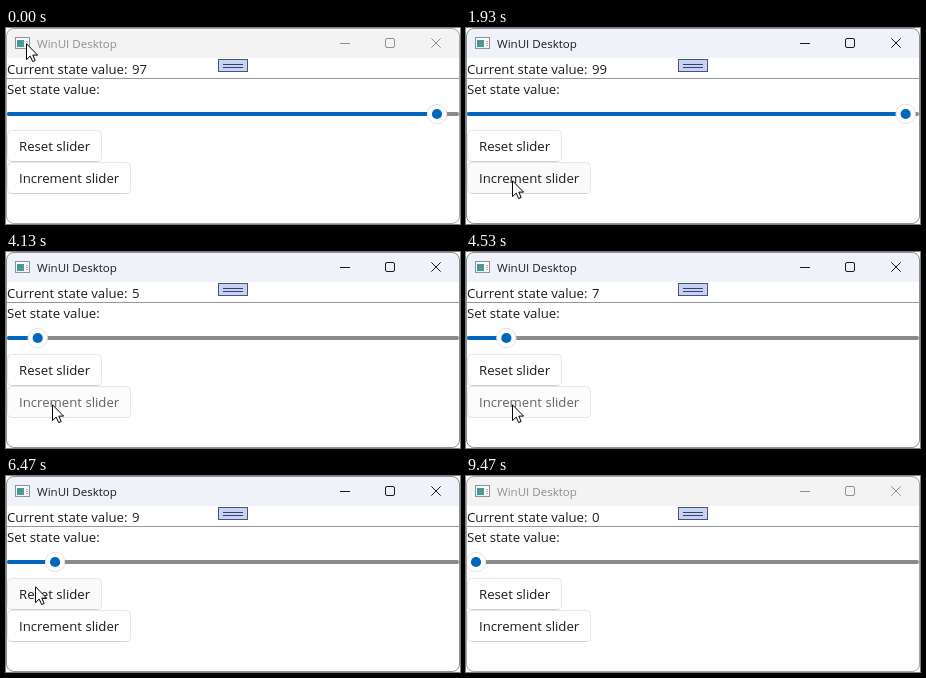
Recreate the animation shown at these times as an HTML page. Size 454 px wide and 196 px high, loop 9590 ms.

```html
<!DOCTYPE html>
<html lang="en">
<head>
<meta charset="utf-8">
<title>WinUI Desktop</title>
<style>
html, body { margin: 0; width: 100%; height: 100%; overflow: hidden; background: #fff; }
svg { display: block; font: 13.2px "Open Sans", "Noto Sans", sans-serif; fill: #1b1b1b; }
#bar { fill: #eff3f9; }
#caption { fill: #1a1a1a; font-size: 11.55px; }
#controls { fill: none; stroke: #1a1a1a; }
#frame { fill: none; stroke: #8c9096; }
.idle #bar { fill: #f3f3f3; }
.idle #caption { fill: #8f8f8f; }
.idle #controls { stroke: #8f8f8f; }
.idle #frame { stroke: #a6a6a6; }
.button rect { fill: #fefefe; stroke: #e6e6e6; }
.button path { stroke: #d0d0d0; }
.hover rect { fill: #fafafa; }
.pressed rect { fill: #fcfcfc; }
.pressed path { stroke: #e6e6e6; }
.pressed text { fill: #636363; }
.accent { fill: #0067c0; }
.over .accent { fill: #1975c5; }
</style>
</head>
<body>
<svg id="stage" width="454" height="196" viewBox="0 0 454 196">
  <defs>
    <clipPath id="round"><rect width="454" height="196" rx="8"/></clipPath>
    <linearGradient id="pane" x2="1" y2="1">
      <stop stop-color="#3f8fb0"/><stop offset="1" stop-color="#4fa586"/>
    </linearGradient>
  </defs>
  <g clip-path="url(#round)">
    <rect width="454" height="196" fill="#fff"/>
    <rect id="bar" width="454" height="30"/>
    <rect x="9.5" y="9.5" width="14" height="11" fill="#f8f8f8" stroke="#8d9499"/>
    <rect x="11" y="12" width="7" height="7" fill="url(#pane)"/>
    <path d="M20 13.5h2M20 15.5h2M20 17.5h2" stroke="#a9b0b4"/>
    <text id="caption" x="31" y="20">WinUI Desktop</text>
    <g id="controls">
      <path d="M334 15.5h10M425.3 10.3l9.4 9.4M434.7 10.3l-9.4 9.4"/>
      <rect x="379.5" y="10.5" width="9" height="9" rx="1.5"/>
    </g>

    <text x="1" y="46">Current state value:</text>
    <text id="value" x="126" y="46"></text>
    <path d="M0 50.5H454" stroke="#989898"/>
    <rect x="212.5" y="31.5" width="29" height="12" fill="#c8d3f4" stroke="#47527f"/>
    <path d="M217 36.5h20M217 39.5h20" stroke="#35406e"/>
    <text x="1" y="66">Set state value:</text>

    <g id="slider">
      <rect x="1" y="84" width="452" height="4" rx="2" fill="#8a8a8a"/>
      <rect id="fill" class="accent" x="1" y="84" height="4" rx="2"/>
      <g id="thumb">
        <circle r="9.7" fill="#fff" stroke="#e2e2e2"/>
        <circle class="accent" r="5.1"/>
      </g>
    </g>

    <g id="reset" class="button">
      <rect x="1.5" y="102.5" width="94" height="31" rx="4"/>
      <path d="M5 133.5h87"/>
      <text x="13" y="123">Reset slider</text>
    </g>
    <g id="increment" class="button">
      <rect x="1.5" y="134.5" width="123" height="31" rx="4"/>
      <path d="M5 165.5h116"/>
      <text x="13" y="155">Increment slider</text>
    </g>
  </g>
  <rect id="frame" x=".5" y=".5" width="453" height="195" rx="7.5"/>
  <path id="cursor" d="M.5 .8V16.6L4.2 13.1 6.7 18.6 9.2 17.5 6.8 12.1H11.6Z"
        fill="#fff" stroke="#000" stroke-linejoin="round"/>
</svg>
<script>
const LOOP = 9590, RATE = 15;
const $ = id => document.getElementById(id);

// All times below are ticks of 1/15 s.
const values = [[0, 97], [19, 98], [29, 99], [39, 100], [49, 1], [53, 2], [56, 3],
  [58, 4], [61, 5], [64, 6], [67, 7], [69, 8], [73, 9], [111, 0]];
const presses = {
  increment: [[17, 19], [27, 29], [38, 39], [47, 49], [51, 53], [60, 61],
    [62, 64], [65, 67], [68, 69], [70, 73]],
  reset: [[109, 111]]
};

const smooth = p => p * p * (3 - 2 * p);
const speedUp = p => p * p;
const moves = [
  { start: 0, end: 8, from: [20, 15], to: [46, 152], ease: smooth },
  { start: 87, end: 93, from: [46, 152], to: [27, 106], ease: smooth },
  { start: 95, end: 97, from: [27, 106], to: [29, 110], ease: smooth },
  { start: 125, end: 132, from: [29, 110], to: [211, 216], ease: speedUp }
];

function cursorAt(tick) {
  const { start, end, from, to, ease } = moves.findLast(m => tick >= m.start);
  const p = ease(Math.min(1, (tick - start) / (end - start)));
  return from.map((a, i) => Math.round(a + (to[i] - a) * p));
}

function drawButton(id, width, top, tick, [x, y]) {
  const state = $(id).classList;
  state.toggle("hover", x < width && y >= top && y < top + 32);
  state.toggle("pressed", presses[id].some(([a, b]) => tick >= a && tick < b));
}

function draw(time) {
  const tick = Math.floor((time + 4) * RATE / 1000);
  const value = values.findLast(([start]) => tick >= start)[1];
  const tip = cursorAt(tick);
  const x = 10 + 4.34 * value;

  $("stage").classList.toggle("idle", tick < 17 || tick >= 142);
  $("value").textContent = value;
  $("fill").setAttribute("width", x - 1);
  $("thumb").setAttribute("transform", `translate(${x} 86)`);
  $("slider").classList.toggle("over", tip[1] >= 70 && tip[1] < 102);
  drawButton("reset", 96, 102, tick, tip);
  drawButton("increment", 125, 134, tick, tip);
  $("cursor").setAttribute("transform", `translate(${tip})`);
}

function loop() {
  draw(performance.now() % LOOP);
  requestAnimationFrame(loop);
}
loop();
</script>
</body>
</html>
```
